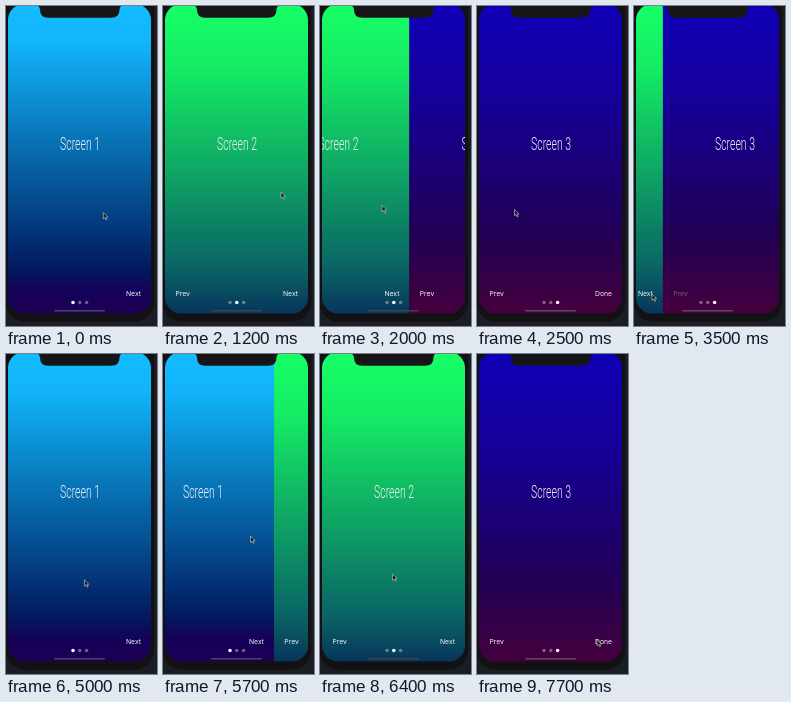
An HTML page for the animation above (7.8 s loop, 151x320 px).

```html
<!DOCTYPE html>
<html lang="en">
<head>
<meta charset="utf-8">
<title>Onboarding pager</title>
<style>
  html, body { margin: 0; width: 100%; height: 100%; overflow: hidden; background: #1b1d24; }
  svg { display: block; width: 100vw; height: 100vh; }
  text { fill: #f4f4f8; }
  .title { font: 300 17.5px Roboto, "Open Sans", sans-serif; }
  .button { font: 400 6.8px Inter, Roboto, sans-serif; }
  .right { text-anchor: end; }
</style>
</head>
<body>
<svg viewBox="0 0 151 320" preserveAspectRatio="none">
  <defs>
    <clipPath id="screen"><rect x="2" y="-2" width="143" height="309.5" rx="16"/></clipPath>
  </defs>
  <rect width="151" height="320" fill="#1b1d24"/>
  <rect x="-1.5" y="-24" width="150.5" height="340.5" rx="21" fill="#121214" stroke="#202124"/>
  <g clip-path="url(#screen)">
    <g id="pages"></g>
    <g id="dots"></g>
    <rect id="home" x="48" y="304" width="51" height="1.4" rx=".7"/>
  </g>
  <path fill="#161618" d="M30 -1 Q34 0 34 4 Q34 11.700 42 11.700 H105 Q113.500 11.700 113.500 4 Q113.500 0 117 -1 Z"/>
  <path id="cursor" d="M0 0 V6.300 L1.500 5 L2.600 7.400 L3.700 6.900 L2.600 4.600 H4.500 Z"
        fill="#151518" stroke="#d4d4d4" stroke-width=".6" stroke-linejoin="round"/>
</svg>
<script>
const LOOP = 7800, STEP = 100, PAGE_WIDTH = 143;
const NS = "http://www.w3.org/2000/svg";
const $ = id => document.getElementById(id);

function add(parent, tag, attrs, text) {
  const node = document.createElementNS(NS, tag);
  for (const name in attrs) node.setAttribute(name, attrs[name]);
  if (text) node.textContent = text;
  return parent.appendChild(node);
}

const screens = [
  { stops: [[0, "#13bbff"], [.12, "#12b4fa"], [.5, "#0666a8"], [.7, "#043c80"], [.85, "#03195f"], [.93, "#150059"], [1, "#1d0054"]],
    next: "Next", home: "#4c4660" },
  { stops: [[0, "#17ff66"], [.2, "#14ec64"], [.85, "#0a6465"], [1, "#07355c"]],
    prev: "Prev", next: "Next", home: "#45434a" },
  { stops: [[0, "#1000b6"], [.3, "#150099"], [.75, "#220054"], [1, "#45003d"]],
    prev: "Prev", next: "Done", home: "#5d4a62" }
];

screens.forEach((screen, i) => {
  const gradient = add(document.querySelector("defs"), "linearGradient",
    { id: "fill" + i, x1: 0, y1: 0, x2: 0, y2: 1 });
  for (const [offset, color] of screen.stops)
    add(gradient, "stop", { offset, "stop-color": color });

  const page = add($("pages"), "g", { transform: `translate(${i * PAGE_WIDTH} 0)` });
  add(page, "rect", { x: 2, width: PAGE_WIDTH, height: 308, fill: `url(#fill${i})` });
  add(page, "text", { class: "title", transform: "translate(54 144) scale(.6 1)" }, `Screen ${i + 1}`);
  if (screen.prev) screen.prevLabel = add(page, "text", { class: "button", x: 12.4, y: 290.2 }, screen.prev);
  screen.nextLabel = add(page, "text", { class: "button right", x: 135, y: 290.2 }, screen.next);
  screen.dot = add($("dots"), "circle", { cx: 67 + i * 6.8, cy: 296.4, r: 1.75, fill: "#fff" });
});

const linear = u => u;
const easeOut = u => 1 - (1 - u) ** 3;
const easeInOut = u => (1 - Math.cos(Math.PI * u)) / 2;

// Keys are [time, value, easing into this key].
const pageKeys = [
  [0, 0], [100, 0], [450, .44], [850, 1, easeOut],
  [1650, 1], [2100, 1.5], [2450, 2, easeOut],
  [3400, 2], [3750, 1, easeInOut],
  [4320, 1], [4670, 0, easeInOut],
  [5480, 0], [5700, .238], [5850, .45], [6200, 1, easeOut],
  [7000, 1], [7350, 2, easeInOut]
];
const cursorKeys = [
  [0, [97.3, 206.5]], [100, [97, 206.5]], [450, [34, 206]], [650, [38, 203]],
  [1200, [118, 186], easeInOut], [1650, [118, 187]], [2100, [46, 203]], [2500, [37.5, 203.5], easeOut],
  [3250, [18, 288], easeInOut], [4500, [18, 288]],
  [5400, [121, 182], easeInOut], [5480, [121, 182]], [5700, [87.5, 182]], [5850, [58, 190]],
  [6100, [60, 211]], [6400, [72.5, 220]], [6900, [120.5, 285.5], easeInOut], [7700, [120, 285.5]]
];
const presses = [
  { time: 3350, screen: 2, label: "prevLabel" },
  { time: 4270, screen: 1, label: "prevLabel" },
  { time: 6950, screen: 1, label: "nextLabel" }
];

function sample(keys, t) {
  const i = keys.findIndex(key => key[0] > t);
  if (i < 0) return keys[keys.length - 1][1];
  const [t0, a] = keys[i - 1], [t1, b, ease = linear] = keys[i];
  const u = ease((t - t0) / (t1 - t0));
  const mix = (p, q) => p + (q - p) * u;
  return Array.isArray(a) ? a.map((p, k) => mix(p, b[k])) : mix(a, b);
}

function draw(time) {
  const t = Math.floor((time % LOOP) / STEP) * STEP;
  const position = sample(pageKeys, t);
  const active = Math.round(position);

  $("pages").setAttribute("transform", `translate(${-position * PAGE_WIDTH} 0)`);
  $("cursor").setAttribute("transform", `translate(${sample(cursorKeys, t)})`);
  $("home").setAttribute("fill", screens[active].home);
  screens.forEach((screen, i) => screen.dot.setAttribute("opacity", i === active ? 1 : .36));

  for (const { screen, label } of presses) screens[screen][label].setAttribute("opacity", 1);
  for (const { time: pressed, screen, label } of presses)
    if (t >= pressed && t < pressed + 250) screens[screen][label].setAttribute("opacity", .35);
}

const start = performance.now();
function tick() {
  draw(performance.now() - start);
  requestAnimationFrame(tick);
}
tick();
</script>
</body>
</html>
```
